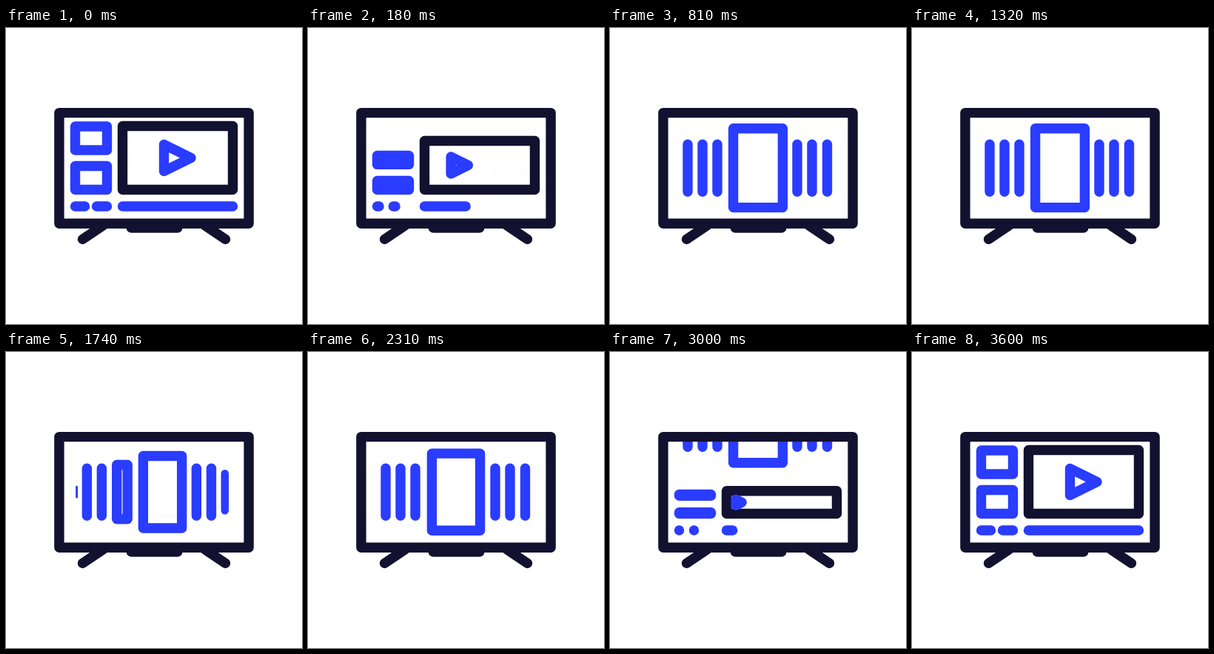
Recreate the animation shown at these times as an HTML page with a canvas. Size 400 px wide and 400 px high, loop 4630 ms.

```html
<!DOCTYPE html>
<html lang="en">
<head>
<meta charset="utf-8">
<title>TV menu</title>
<style>
  html, body { margin: 0; height: 100%; overflow: hidden; background: #fff; }
  canvas { display: block; }
</style>
</head>
<body>
<canvas id="stage" width="400" height="400"></canvas>
<script>
const ctx = document.getElementById('stage').getContext('2d');
const LOOP = 4630, STROKE = 13.4, DARK = '#12112f', BLUE = '#2a3cff';

const clamp = u => Math.min(1, Math.max(0, u));
const lerp = (a, b, u) => a + (b - a) * u;
const span = (t, start, length) => clamp((t - start) / length);
const inOut = u => u < .5 ? 2 * u * u : 1 - 2 * (1 - u) ** 2;
const settle = u => 1 - (1 - u * u) ** 4;
const outQuint = u => 1 - (1 - u) ** 5;

function path(color, width, points, closed) {
  if (width < .1) return;
  ctx.strokeStyle = color;
  ctx.lineWidth = width;
  ctx.beginPath();
  points.forEach(([x, y]) => ctx.lineTo(x, y));
  if (closed) ctx.closePath();
  ctx.stroke();
}

const line = (color, width, x1, y1, x2, y2) =>
  path(color, width, [[x1, y1], [x2 + .01, y2]]);

function box(color, width, x1, y1, x2, y2) {
  if (x2 - x1 < .1) return line(color, width, x1, y1, x1, y2);
  path(color, width, [[x1, y1], [x2, y1], [x2, y2], [x1, y2]], true);
}

// Carousel slots from left to right; the outermost two are hidden.
const SLOTS = {
  x: [93, 105, 125, 145, 200, 253, 273, 293.5, 304],
  halfW: [0, 0, 0, 0, 33.4, 0, 0, 0, 0],
  halfH: [0, 32, 32, 32, 53.4, 32, 32, 32, 0],
  width: [0, 1, 1, 1, 1, 1, 1, 1, 0]
};

function slot(name, position) {
  const i = Math.min(7, Math.floor(position));
  return lerp(SLOTS[name][i], SLOTS[name][i + 1], position - i);
}

function drawCarousel(t) {
  if (t < 180 || t > 3240) return;
  const grow = outQuint(span(t, 180, 630));
  const pop = outQuint(span(t, 180, 240));
  const slide = (inOut(span(t, 1050, 270)) + inOut(span(t, 1560, 270))) % 1;
  const press = 1 - .07 * Math.sin(Math.PI * span(t, 2280, 270));
  const y = 189.2 - 136 * inOut(span(t, 2640, 600));
  for (let k = 1; k <= 8; k++) {
    const position = k - slide;
    const scale = k === 4 ? press : 1;
    const x = slot('x', position);
    const w = slot('halfW', position) * pop * scale;
    const h = slot('halfH', position) * grow * scale;
    box(BLUE, STROKE * slot('width', position) * pop, x - w, y - h, x + w, y + h);
  }
}

function drawGrid(clock) {
  if (clock <= 0) return;
  const pop = outQuint(span(clock, 0, 150));
  const width = STROKE * pop;
  const screen = settle(span(clock, 0, 560));
  const tiles = settle(span(clock, 110, 600));
  const dots = settle(span(clock, 180, 560));
  const play = settle(span(clock, 40, 570));

  const top = 218.5 - 86 * screen, middle = (top + 218.5) / 2;
  box(DARK, width, 157.5, top, 157.5 + 149 * pop, 218.5);
  const point = (x, y) => [157.5 + x * play, middle + y * play + .01 * x];
  if (play > 0) {
    path(BLUE, width, [point(56, -18), point(92.5, 0), point(56, 18)]
      .map(([x, y], i) => [x, y - .01 * (i === 1 ? 92.5 : 56)]), true);
  }

  const height = 32 * tiles, right = 93.5 + 43 * pop;
  box(BLUE, width, 93.5, 218.5 - height, right, 218.5);
  const upper = 218.5 - height - lerp(22.5, 21.5, tiles);
  box(BLUE, width, 93.5, upper - height, right, upper);

  line(BLUE, width, 93.5, 241, 93.5 + 13 * dots, 241);
  line(BLUE, width, 113.5 + 9 * dots, 241, 113.5 + 23 * dots, 241);
  line(BLUE, width, 157.5, 241, 157.5 + 149 * tiles, 241);
}

function drawTv() {
  line(DARK, STROKE, 103.5, 285.5, 131, 267);
  line(DARK, STROKE, 296.5, 285.5, 269, 267);
  line(DARK, STROKE, 169.3, 270, 231.8, 270);
  box(DARK, STROKE, 71.9, 114.6, 328.1, 264.2);
}

function draw(t) {
  ctx.fillStyle = '#fff';
  ctx.fillRect(0, 0, 400, 400);
  ctx.lineCap = ctx.lineJoin = 'round';
  ctx.save();
  ctx.beginPath();
  ctx.rect(78, 120.5, 244, 138);
  ctx.clip();
  drawCarousel(t);
  drawGrid(t < 600 ? 780 * (1 - t / 300) : t - 2820);
  ctx.restore();
  drawTv();
}

const begin = performance.now();
function tick() {
  draw((performance.now() - begin) % LOOP);
  requestAnimationFrame(tick);
}
tick();
</script>
</body>
</html>
```
